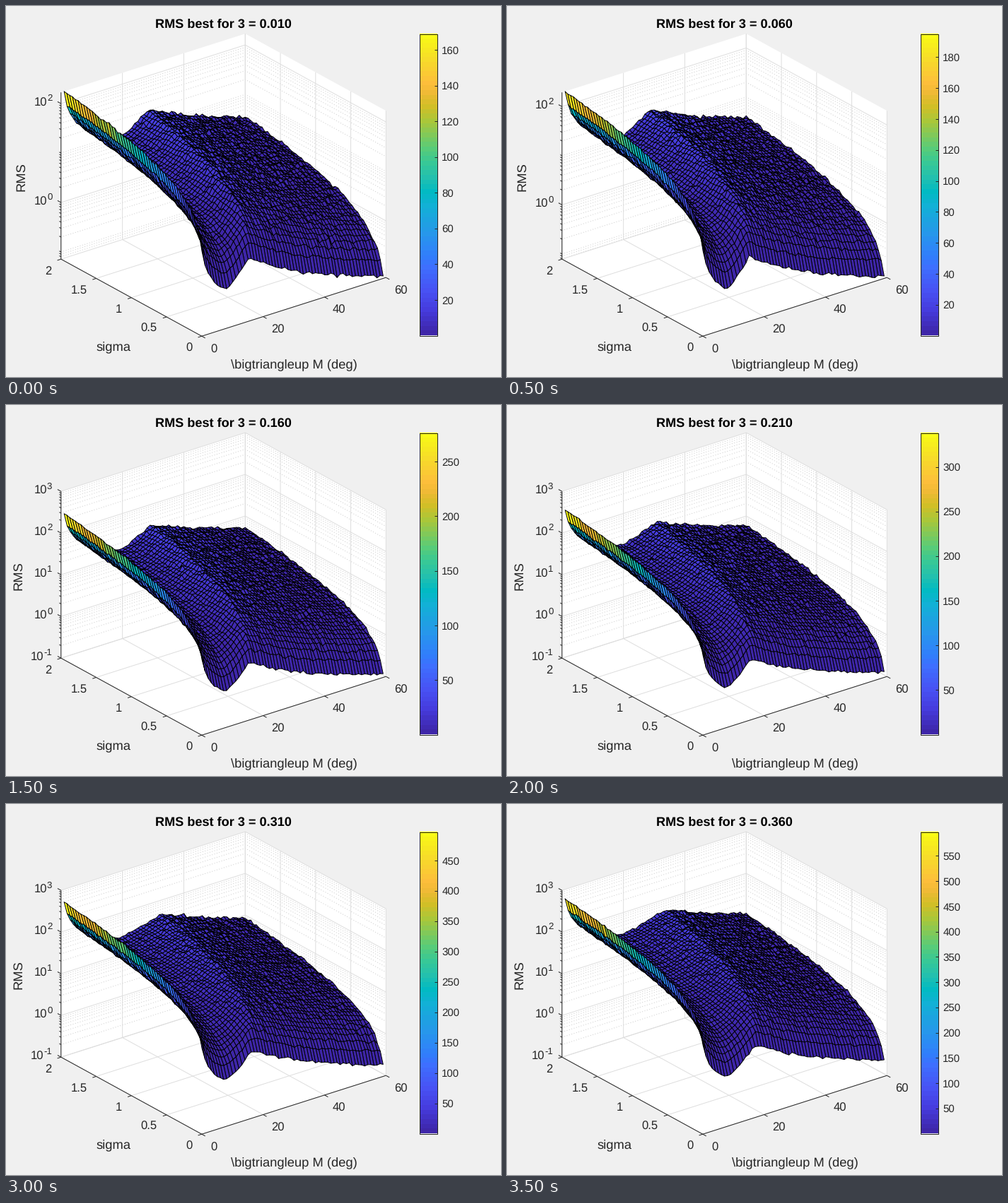
These frames come from a looping animation (700 by 525 pixels, 4000 ms). A matplotlib script:

```python
import numpy as np
import matplotlib.pyplot as plt
from matplotlib.animation import FuncAnimation
from matplotlib.collections import LineCollection, PolyCollection
from matplotlib.colors import LinearSegmentedColormap

W, H, DPI = 700, 525, 100
PX = 72 / DPI
INK = "#262626"
GRID = "#dedede"
MINOR = "#cccccc"
BOX_H = 236

plt.rcParams["font.family"] = "Liberation Sans"
plt.rcParams["text.hinting"] = "no_hinting"

PARULA = LinearSegmentedColormap.from_list("parula", [(i / 63, c) for i, c in [
    (0, "#3e26a8"), (5, "#463cde"), (9, "#4852f4"), (14, "#3e6fff"),
    (16, "#327cfc"), (18, "#2e87f7"), (21, "#2797eb"), (27, "#12b1d6"),
    (30, "#02bac3"), (33, "#24c1ae"), (36, "#37c897"), (39, "#57cc7a"),
    (45, "#abc739"), (48, "#d1bf27"), (51, "#f0ba36"), (53, "#febe3c"),
    (58, "#f7dc2a"), (63, "#f9fb15")]], N=64)

# Per step: peak RMS, and log10 of the RMS at the far right corner
PEAK = [168.9, 195, 235.4, 276.3, 338, 414, 497, 597.5]
LOW = [-1.145, -1.105, -1.06, -0.97, -0.92, -0.864, -0.77, -0.66]

M = np.arange(1, 61)
S = np.arange(1, 51) * 0.04
MM, SS = np.meshgrid(M, S)


def project(m, s, h=0):
    """Anomaly m, sigma s and height h (0..1) to stage pixels."""
    x = 276.3 + 260.5 * m / 60 - 99.5 * s
    y = 466.7 - 83 * m / 60 - 54.5 * s - BOX_H * h
    return np.stack(np.broadcast_arrays(x, y), axis=-1)


def surface(k):
    """log10 of the RMS on the grid at step k."""
    t = k / 7
    near = np.log10(PEAK[k] * SS / 2 / MM)
    u = np.log10(60 / MM)
    far = (LOW[k] + np.log10(SS / 0.04)
           + (2.6 + 0.6 * t) * u - (0.75 + 0.5 * t) * u ** 2)
    # The crossover between both branches moves outwards with sigma
    grow = (SS / 2) ** 0.65
    start = 7.2 + 11.5 * grow
    front = 15.0 + 1.7 * t ** 3
    end = front + (28.7 + 5.8 * t ** 2 - front) * grow
    w = np.clip((MM - start) / (end - start), 0, 1) ** 1.4
    rng = np.random.default_rng(40 + k)
    noise = rng.normal(0, 1, MM.shape) * (0.013 + 0.007 * w)
    log_z = near * (1 - w) + far * w + noise
    top = np.log10(PEAK[k])
    log_z = np.clip(log_z, LOW[k], top)
    log_z[-1, 0] = top
    return log_z


fig = plt.figure(figsize=(W / DPI, H / DPI), dpi=DPI, facecolor="#f0f0f0")
ax = fig.add_axes([0, 0, 1, 1])


def label(x, y, text, size=16.67, ha="center", **kw):
    ax.text(x, y, text, fontsize=size * PX, ha=ha, va="baseline",
            color=kw.pop("color", INK), **kw)


def lines(segs, color=INK, width=1.0, style="solid", z=1):
    ax.add_collection(LineCollection(segs, colors=color, linewidths=width * PX,
                                     linestyles=style, zorder=z))


def wall_lines(heights):
    """Level lines across both back walls."""
    return [project(np.array([0, 60, 60]), np.array([2, 2, 0]), h)
            for h in heights]


def draw_box(k):
    lo, hi = (LOW[k], np.log10(PEAK[k])) if k < 3 else (-1, 3)
    step = 2 if k < 3 else 1

    def rel(v):
        return (v - lo) / (hi - lo)

    front, left, back, right = (project(m, s) for m, s in
                                [(0, 0), (0, 2), (60, 2), (60, 0)])
    up = np.array([0, -BOX_H])
    hull = [front, left, left + up, back + up, right + up, right]
    ax.add_patch(plt.Polygon(hull, fc="white", ec="none", zorder=0))

    majors = [v for v in range(-2, 4, step) if lo <= v <= hi]
    minors = [d + np.log10(j) for d in range(-2, 3) for j in range(1, 10)]
    minors = [v for v in minors if lo <= v <= hi
              and not any(abs(v - m) < 1e-6 for m in majors)]

    grid = []
    for m in (0, 20, 40, 60):
        grid.append(project(np.array([m, m, m]), np.array([0, 2, 2]),
                            np.array([0, 0, 1])))
    for s in (0, 0.5, 1, 1.5, 2):
        grid.append(project(np.array([0, 60, 60]), np.array([s, s, s]),
                            np.array([0, 0, 1])))
    lines(wall_lines(map(rel, minors)), MINOR, 1, (0, (1, 2.5)))
    lines(grid + wall_lines(map(rel, majors)), GRID)

    # Axis lines and outward ticks
    lines([[left + up, left, front, right]], z=2)
    along_m, along_s = np.array([-5.2, 1.7]), np.array([4.9, 2.7])
    ticks = []
    for m in (0, 20, 40, 60):
        p = project(m, 0)
        ticks.append([p, p + along_s])
        label(p[0] + (17.5 if m == 0 else 20.8), p[1] + 23.3, str(m))
    for s in (0, 0.5, 1, 1.5, 2):
        p = project(0, s)
        ticks.append([p, p + along_m])
        x = p[0] - (17.8 if s == int(s) else 24.7)
        label(x, p[1] + 21.3, f"{s:g}")
    for v in minors:
        p = project(0, 2, rel(v))
        ticks.append([p, p - along_s * 0.5])
    for v in majors:
        p = project(0, 2, rel(v))
        ticks.append([p, p - along_s])
        x = 57.5 if v >= 0 else 53
        label(x, p[1] + 3.7, "10", ha="right")
        label(x, p[1] - 3.8, str(v), 13.3, ha="left")
    lines(ticks, z=2)

    label(26.3 if k < 3 else 22.3, 241, "RMS", 18.33,
          rotation=90, rotation_mode="anchor")
    return rel


def draw_surface(k, rel):
    log_z = surface(k)
    p = project(MM, SS, rel(log_z))
    quads = np.stack([p[:-1, :-1], p[:-1, 1:], p[1:, 1:], p[1:, :-1]], axis=2)
    shade = PARULA(10 ** log_z[:-1, :-1] / PEAK[k])
    # Far cells first
    quads = quads[::-1, ::-1].reshape(-1, 4, 2)
    shade = shade[::-1, ::-1].reshape(-1, 4)
    ax.add_collection(PolyCollection(quads, facecolors=shade, edgecolors="black",
                                     linewidths=0.95 * PX, joinstyle="round",
                                     zorder=3))


def draw_colorbar(k):
    x0, x1, y0, y1 = 584, 609, 39, 466
    ax.imshow(np.arange(64)[::-1, None], cmap=PARULA, extent=(x0, x1, y1, y0),
              interpolation="nearest", aspect="auto", zorder=2)
    ax.add_patch(plt.Rectangle((x0, y0), x1 - x0, y1 - y0, fc="none", ec=INK,
                               lw=PX, zorder=4))
    step = 20 if PEAK[k] < 240 else 50
    ticks = []
    for v in range(step, int(PEAK[k]) + 1, step):
        y = y1 - (y1 - y0) * v / PEAK[k]
        ticks.append([(x1 - 4, y), (x1, y)])
        label(615.7, y + 5.5, str(v), 15, ha="left")
    lines(ticks, z=4)


def draw(k):
    ax.clear()
    ax.axis("off")
    rel = draw_box(k)
    draw_surface(k, rel)
    draw_colorbar(k)
    label(307, 30.5, f"RMS best for 3 = {0.01 + 0.05 * k:.3f}", 18.2,
          weight="bold", color="black")
    label(151.3, 486.3, "sigma", 18.33)
    label(407, 512, r"\bigtriangleup M (deg)", 18.33)
    ax.set_xlim(-0.5, W - 0.5)
    ax.set_ylim(H - 0.5, -0.5)
    return []


anim = FuncAnimation(fig, draw, frames=8, init_func=lambda: [], interval=500,
                     repeat=True, repeat_delay=0)
plt.show()
```
